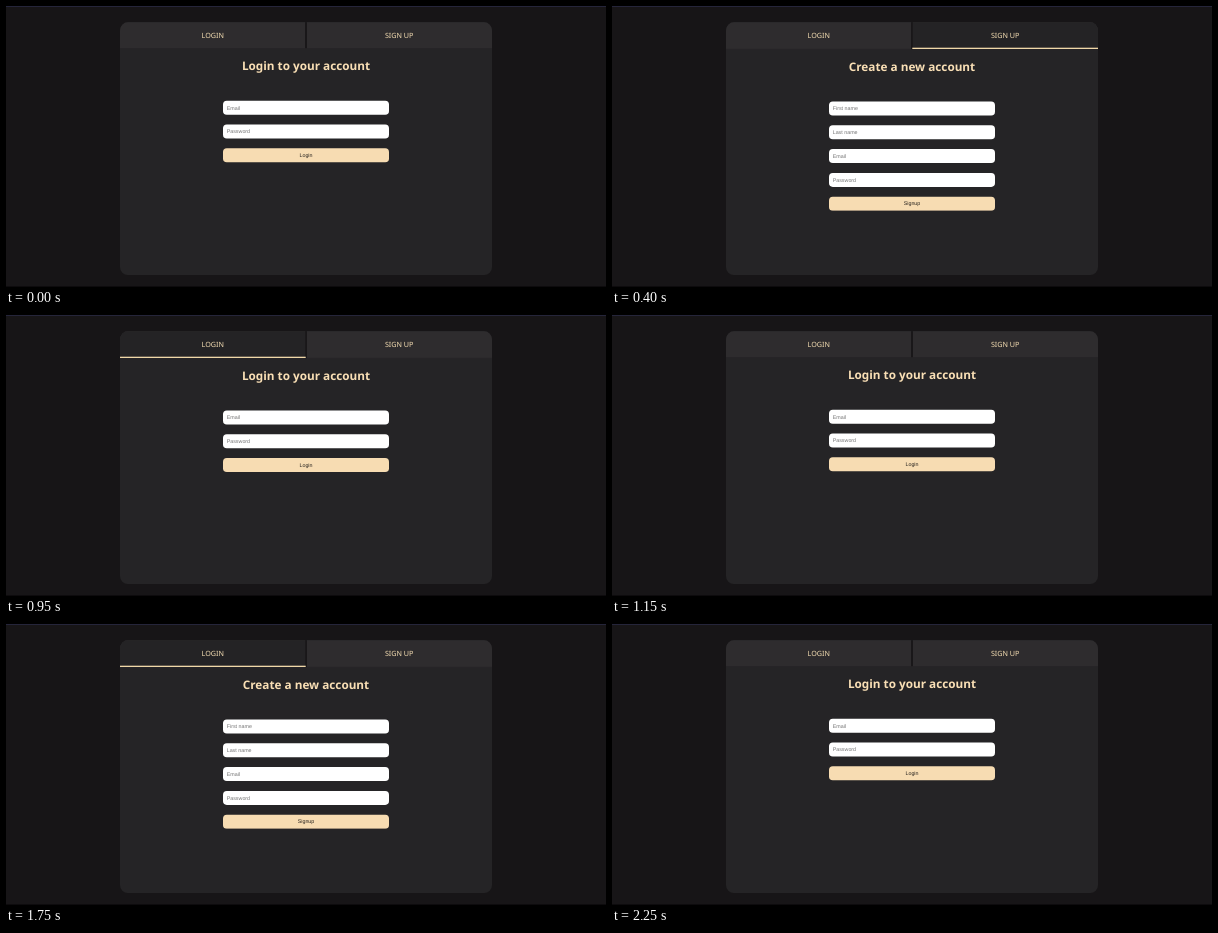
Recreate the animation shown at these times as an HTML page. Size 600x281 px, loop 2.85 s.

```html
<!DOCTYPE html>
<html lang="en">
<head>
<meta charset="utf-8">
<title>Account form</title>
<style>
  html, body { margin: 0; width: 100%; height: 100%; overflow: hidden; background: #171517; }
  svg { display: block; width: 600px; height: 281px; }
  text { text-rendering: geometricPrecision; }
  .tab { font: 500 7.2px "Noto Sans", "Open Sans", sans-serif; fill: #f5deb3; text-anchor: middle; }
  .title { font: 700 11.75px "Noto Sans", "Open Sans", sans-serif; fill: #f9dfb5; text-anchor: middle; }
  .hint, .action { font: 5.33px "Liberation Sans", Arial, sans-serif; }
  .hint { fill: #757575; }
  .action { fill: #2b2620; text-anchor: middle; }
  .field { fill: #fff; }
  .button { fill: #f7dcb2; }
  .idle { fill: #2e2c2e; }
  .hover { fill: #242325; }
  .line { fill: #f0d8a8; }

  .body, .over-login, .over-signup, .login, .signup { animation: 2850ms step-end infinite; }
  .body { animation-name: nudge; }
  .over-login { animation-name: over-login; }
  .over-signup { animation-name: over-signup; }
  .login { animation-name: login; }
  .signup { animation-name: signup; }

  /* The hovered tab's border pushes everything below it down. */
  @keyframes nudge {
    0%, 40.35%, 77.19%, 100% { transform: translateY(0); }
    5.26%, 47.36% { transform: translateY(.8px); }
  }
  @keyframes over-signup {
    0%, 24.56%, 59.64%, 100% { visibility: hidden; }
    5.26%, 47.36% { visibility: visible; }
  }
  @keyframes over-login {
    0%, 40.35%, 77.19%, 100% { visibility: hidden; }
    24.56%, 59.64% { visibility: visible; }
  }
  @keyframes signup {
    0%, 33.33%, 71.92%, 100% { visibility: hidden; }
    14.03%, 52.63% { visibility: visible; }
  }
  @keyframes login {
    0%, 33.33%, 71.92%, 100% { visibility: visible; }
    14.03%, 52.63% { visibility: hidden; }
  }
</style>
</head>
<body>
<svg viewBox="0 0 600 281">
  <defs>
    <clipPath id="card"><rect x="114" y="16.3" width="372" height="252.7" rx="8"/></clipPath>
  </defs>
  <rect width="600" height="281" fill="#171517"/>
  <rect width="600" height="1" fill="#25253a"/>
  <rect y="280" width="600" height="1" fill="#0d0b0d"/>

  <g clip-path="url(#card)">
    <rect x="114" y="16" width="372" height="254" fill="#252426"/>
    <g class="body">
      <rect class="idle" x="114" y="10" width="372" height="32.2"/>
      <rect x="299.2" y="10" width="1.6" height="32.2" fill="#151315"/>
    </g>
    <g class="over-login">
      <rect class="hover" x="114" y="16" width="185.2" height="27"/>
      <rect class="line" x="114" y="41.7" width="185.7" height="1.3"/>
    </g>
    <g class="over-signup">
      <rect class="hover" x="300.8" y="16" width="185.2" height="27"/>
      <rect class="line" x="300.3" y="41.7" width="185.7" height="1.3"/>
    </g>
  </g>
  <text class="tab" x="206.8" y="32.3">LOGIN</text>
  <text class="tab" x="393.2" y="32.3">SIGN UP</text>

  <g class="body" id="forms"></g>
</svg>
<script>
  const FIRST = 94.7, STEP = 23.8;

  const box = (kind, i) =>
    `<rect class="${kind}" x="217" y="${FIRST + STEP * i}" width="166" height="14" rx="3.8"/>`;

  const label = (kind, x, i, text) =>
    `<text class="${kind}" x="${x}" y="${FIRST + STEP * i + 8.8}">${text}</text>`;

  function form(name, title, fields, action) {
    const n = fields.length;
    return `<g class="${name}"><text class="title" x="300" y="63.8">${title}</text>` +
      fields.map((f, i) => box("field", i) + label("hint", 220.7, i, f)).join("") +
      box("button", n) + label("action", 300, n, action) + "</g>";
  }

  document.getElementById("forms").innerHTML =
    form("login", "Login to your account", ["Email", "Password"], "Login") +
    form("signup", "Create a new account", ["First name", "Last name", "Email", "Password"], "Signup");
</script>
</body>
</html>
```
